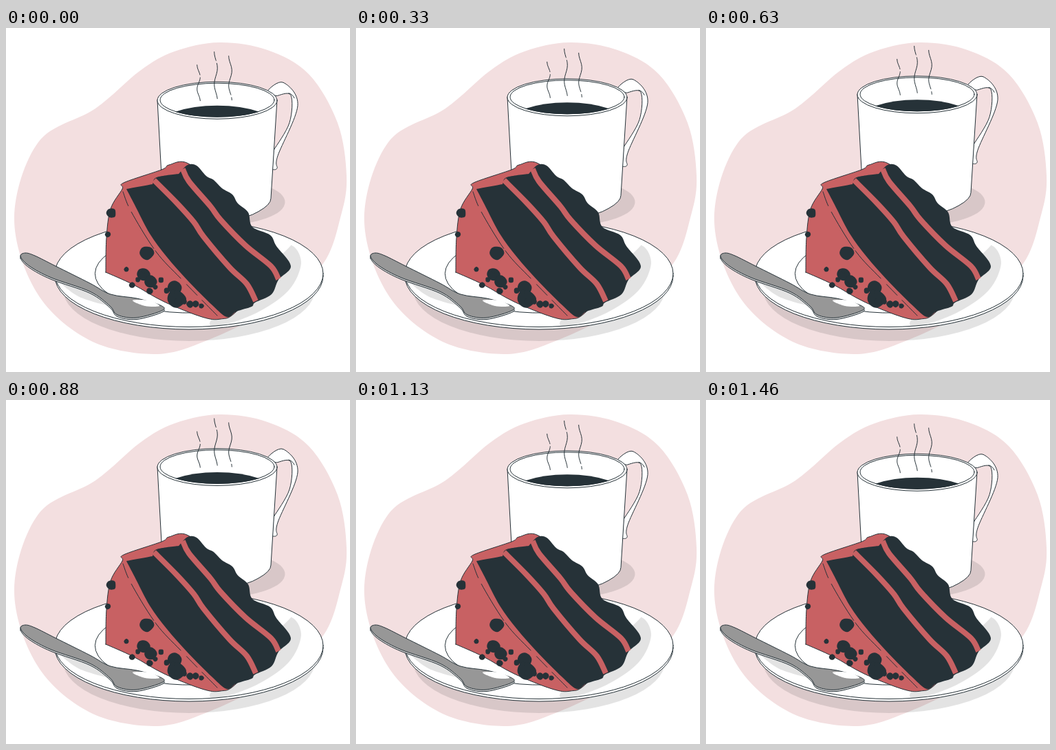
Recreate the animation shown at these times as an HTML page. Size 500 by 500 pixels, loop 1500 ms.

```html
<!DOCTYPE html>
<html lang="en">
<head>
<meta charset="utf-8">
<title>Cake and coffee</title>
<style>
  html, body { margin: 0; height: 100%; overflow: hidden; background: #fff; }
  svg { display: block; width: 100vw; height: 100vh; }
  .line { fill: none; stroke: #263238; stroke-linecap: round; stroke-linejoin: round; }
  .white { fill: #fff; }
  .shade { fill: #000; opacity: .11; }
  .dark { fill: #263238; }
  .red { fill: #c86163; }
  .cream { fill: none; stroke: #c86163; stroke-width: 8; }
  .grey { fill: #979797; }
  .rim { fill: #d0d0d0; }
</style>
</head>
<body>
<svg viewBox="0 0 500 500">
  <path fill="#f3dfe0" data-curve="310,21 380,32 440,67 482,138 495,215 487,272 460,344 390,405 290,455 214,474 120,453 45,385 12,276 47,166 130,117 195,62 245,34 z"/>
  <ellipse class="shade" cx="315" cy="253" rx="90.500" ry="33"/>

  <g id="cup">
    <path class="line white" data-curve="380,92 403,79.500 424,113 395,186 394,204 387,206 387,206 389,178 389,178 412,138 414,98 393,99 393,99 z"/>
    <path class="line" d="M411 95Q416 96 419 102"/>
    <path class="line white" d="M220 105 226 215 270 278Q335 286 367 267 385 257 385 248L394 105Z"/>
    <ellipse class="line white" cx="307" cy="105.500" rx="87" ry="27"/>
    <ellipse class="line white" cx="307" cy="105" rx="83" ry="24.500"/>
    <path class="dark" d="M246 122Q272 113 307 113T368 122A83 24.500 0 0 1 246 122Z"/>
    <g id="steam" class="line"></g>
  </g>

  <ellipse class="shade" cx="266" cy="380" rx="183" ry="75"/>
  <ellipse class="line white" cx="266" cy="360.500" rx="195" ry="77.500"/>
  <ellipse class="line white" cx="266" cy="357" rx="195" ry="77.500"/>
  <path class="line" d="M275 414A137 57 0 0 1 150 327"/>
  <path class="shade" data-curve="400,330 417,317 429,342 412,380 370,411 320,430 300,422 z"/>
  <path class="shade" data-curve="80,367 150,396 152,404 105,390 z"/>

  <path class="line red" data-curve="145,355 145,355 146,305 152,263 169,234 171,225 226,206 237,199 265,197 310,240 390,350 335,412 312,423 285,420 230,398 185,373 z"/>
  <path class="dark" data-curve="175,234 175,234 213,227 213,227 219,217 251,212 251,212 264,199 277,200 291,215 302,221 314,233 329,242 337,255 352,268 358,289 384,301 393,317 414,346 396,366 386,387 362,399 357,405 335,412 321,420 300,403 264,367 234,333 209,299 187,257 z"/>
  <path class="cream" data-curve="215,221 247,253 273,282 287,303 325,348 350,372 363,397"/>
  <path class="cream" data-curve="257,205 266,223 297,259 312,279 348,316 385,346 396,365"/>
  <path class="line" stroke-dasharray="22 10 62 4 55 12" data-curve="170,238 182,267 218,325 256,366 307,418"/>
  <g id="crumbs" class="dark"></g>

  <g id="spoon">
    <path class="line rim" transform="translate(0 2.500)" data-curve="21,332 28,327 42,331 72,346 122,371 152,387 190,393 222,402 228,410 190,421 162,417 151,404 122,383 66,363 34,346 z"/>
  </g>
  <path class="white" data-curve="184,396 208,396 223,404 202,404 z"/>
</svg>
<script>
  const TAU = Math.PI * 2;
  const $ = id => document.getElementById(id);

  // Smooth path through points; a repeated point makes a corner.
  function curve(text) {
    const closed = text.endsWith('z');
    const points = text.replace(' z', '').split(' ').map(p => p.split(',').map(Number));
    const n = points.length;
    const at = i => points[closed ? (i + n) % n : Math.max(0, Math.min(n - 1, i))];
    const handle = (i, sign) => at(i).map((v, k) => v + sign * (at(i + 1)[k] - at(i - 1)[k]) / 6);
    let d = 'M' + points[0];
    for (let i = 0; i < (closed ? n : n - 1); i++) {
      if (String(at(i)) === String(at(i + 1))) continue;
      d += 'C' + [handle(i, 1), handle(i + 1, -1), at(i + 1)].join(' ');
    }
    return d + (closed ? 'Z' : '');
  }

  for (const path of document.querySelectorAll('[data-curve]')) {
    path.setAttribute('d', curve(path.dataset.curve));
  }

  const spoonFace = $('spoon').firstElementChild.cloneNode();
  spoonFace.removeAttribute('transform');
  spoonFace.setAttribute('class', 'line grey');
  $('spoon').append(spoonFace);

  // A wavy wisp with one short gap after the given length.
  function wisp(x, top, period, gap) {
    const points = [];
    for (let y = top; y <= 106; y += 4) {
      points.push(`${x - 2.3 * Math.cos(TAU * (y - top) / period)},${y}`);
    }
    return `<path stroke-dasharray="${gap} 4 99" d="${curve(points.join(' '))}"/>`;
  }
  $('steam').innerHTML = wisp(280, 54, 35, 15) + wisp(305, 35, 47, 13) + wisp(326, 41, 43, 58);

  let seed = 7;
  const random = () => (seed = seed * 16807 % 2147483647) / 2147483647;

  function crumb(x, y, size) {
    const points = Array.from({ length: 8 }, (_, i) => {
      const r = size * (.9 + .2 * random());
      return `${x + r * Math.cos(i * TAU / 8)},${y + r * Math.sin(i * TAU / 8)}`;
    });
    return `<path d="${curve(points.join(' ') + ' z')}"/>`;
  }

  let crumbs = crumb(153, 269, 7) + crumb(148, 300, 4) + crumb(205, 327, 10)
    + crumb(200, 358, 9) + crumb(210, 369, 9) + crumb(245, 377, 10) + crumb(248, 394, 13);
  for (let i = 0; i < 14; i++) {
    const t = i / 13;
    const spread = 22 - 18 * t;
    crumbs += crumb(175 + 109 * t, 355 + 47 * t + spread * (random() * 2 - 1), 3 + 2 * random());
  }
  $('crumbs').innerHTML = crumbs;

  const period = 1500, lift = 10, lead = 20;

  function draw() {
    const phase = (performance.now() + lead) % period / period;
    const y = -lift * (1 - Math.abs(1 - 2 * phase));
    $('cup').setAttribute('transform', `translate(0 ${y})`);
    requestAnimationFrame(draw);
  }
  draw();
</script>
</body>
</html>
```
